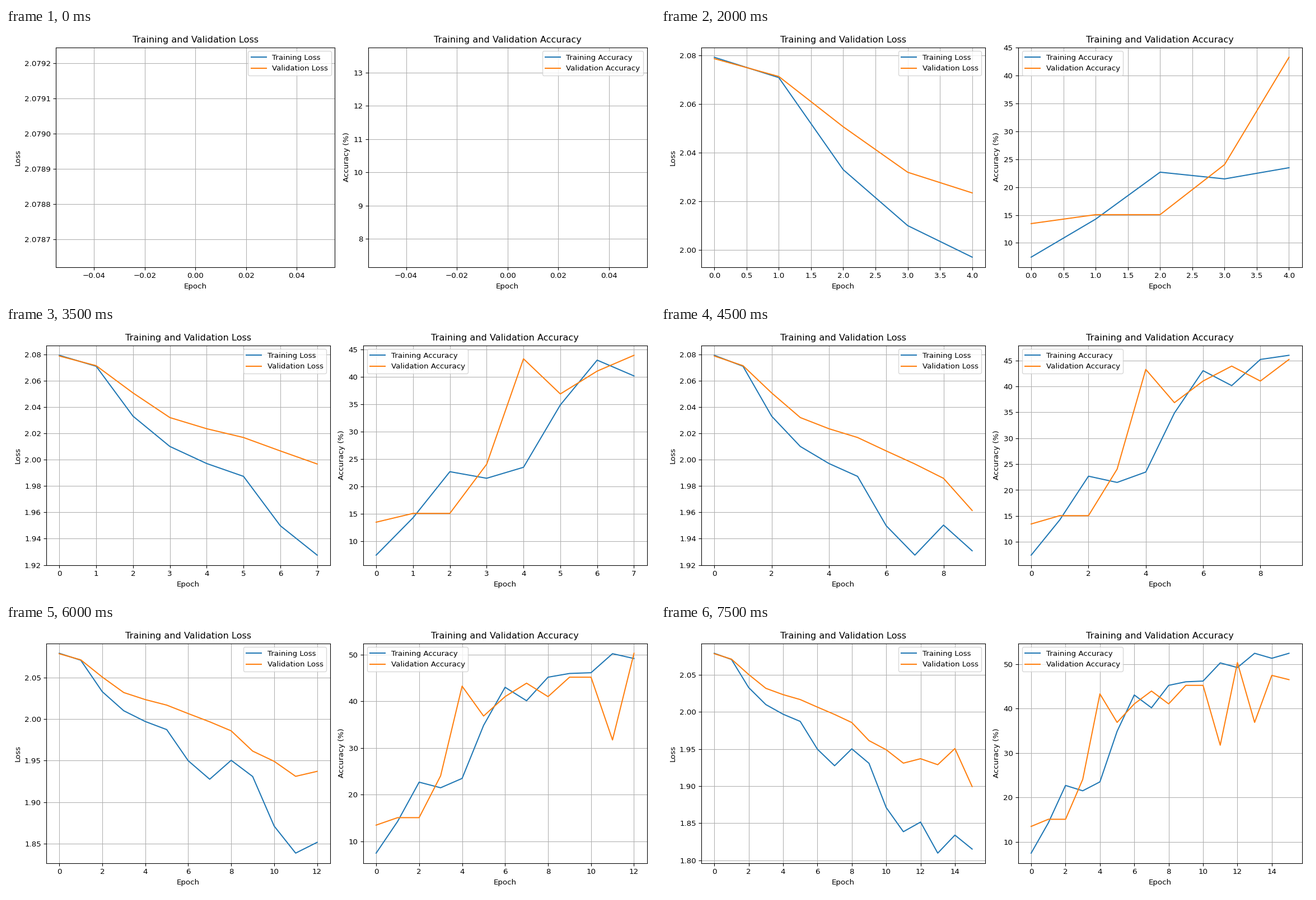
A matplotlib script that plays this animation: 1159x483 px, repeating every 8000 ms.

```python
import numpy as np
import matplotlib.pyplot as plt
from matplotlib.animation import FuncAnimation

WIDTH, HEIGHT, DPI = 1159, 483, 96.6
EPOCHS = 16
STEP_MS = 500
TRAIN_SIZE, VAL_SIZE = 1248, 312

train_loss = [2.079217, 2.07087, 2.0330, 2.01001, 1.99706, 1.9873, 1.9498, 1.9275,
              1.9503, 1.9308, 1.8711, 1.8385, 1.8515, 1.8096, 1.8339, 1.8151]
val_loss = [2.078649, 2.07133, 2.05064, 2.03195, 2.02347, 2.0168, 2.0066, 1.9967,
            1.9858, 1.9614, 1.9491, 1.9310, 1.9370, 1.9289, 1.9507, 1.8994]

# Accuracy is stored as correctly classified samples.
train_hits = np.array([93, 178, 283, 268, 293, 435, 537, 501,
                       564, 574, 576, 627, 614, 654, 640, 654])
val_hits = np.array([42, 47, 47, 75, 135, 115, 128, 137,
                     128, 141, 141, 99, 157, 115, 148, 145])
train_acc = 100 * train_hits / TRAIN_SIZE
val_acc = 100 * val_hits / VAL_SIZE

fig, (ax_loss, ax_acc) = plt.subplots(
    1, 2, figsize=((WIDTH + 0.01) / DPI, (HEIGHT + 0.01) / DPI), dpi=DPI)


def draw_panel(ax, name, unit, train, val, count):
    ax.clear()
    ax.plot(range(count), train[:count], label=f"Training {name}")
    ax.plot(range(count), val[:count], label=f"Validation {name}")
    ax.set_title(f"Training and Validation {name}")
    ax.set_xlabel("Epoch")
    ax.set_ylabel(name + unit)
    ax.legend()
    ax.grid(True)


def update(epoch):
    draw_panel(ax_loss, "Loss", "", train_loss, val_loss, epoch + 1)
    draw_panel(ax_acc, "Accuracy", " (%)", train_acc, val_acc, epoch + 1)
    fig.tight_layout()


anim = FuncAnimation(fig, update, frames=EPOCHS, interval=STEP_MS,
                     repeat=True, repeat_delay=0)
plt.show()
```
